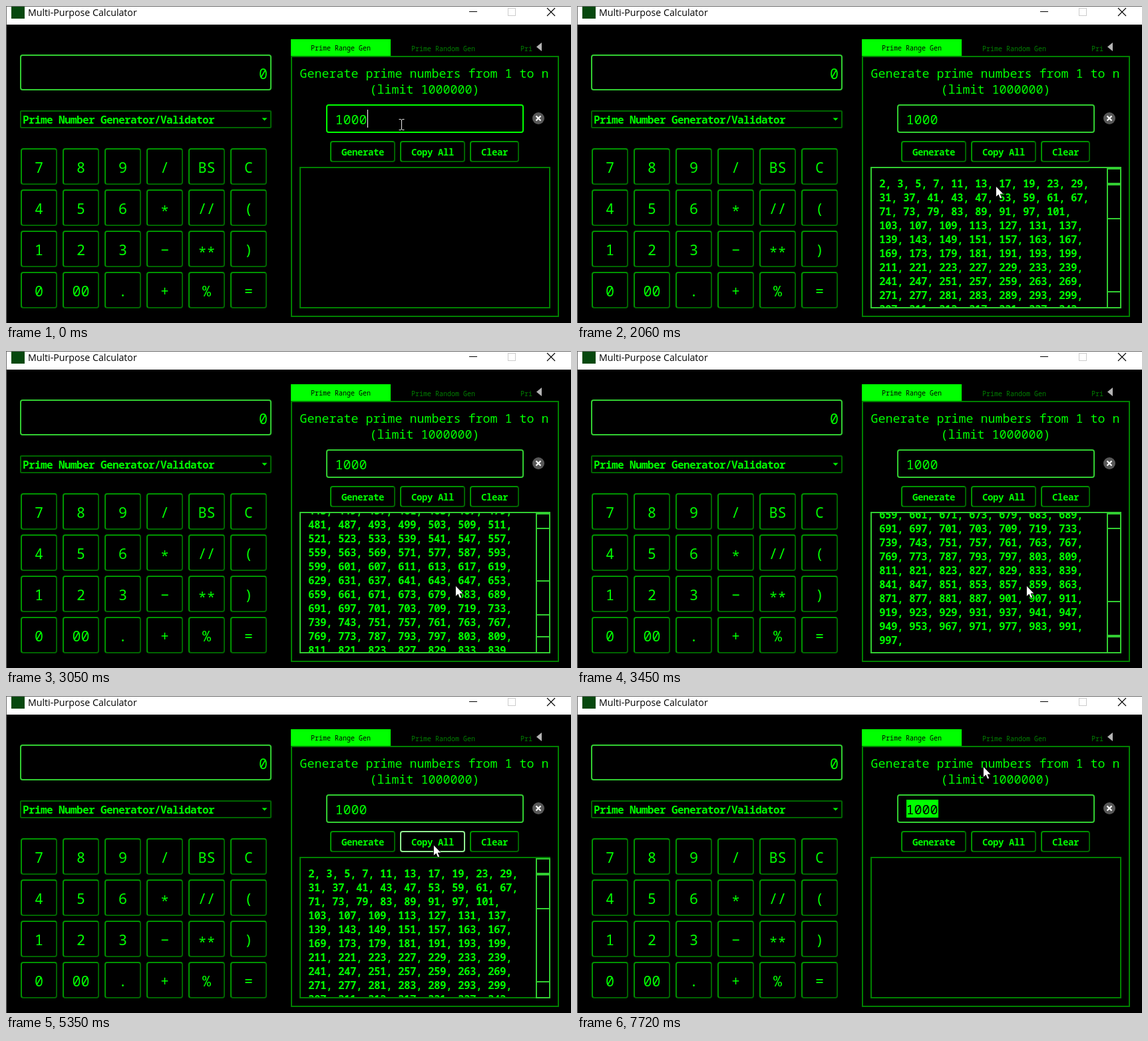
Recreate the animation shown at these times as an HTML page. Size 849 px wide and 477 px high, loop 8000 ms.

```html
<!DOCTYPE html>
<html lang="en">
<head>
<meta charset="utf-8">
<title>Multi-Purpose Calculator</title>
<style>
html, body { margin: 0; width: 100%; height: 100%; overflow: hidden; background: #000; }
svg { display: block; width: 849px; height: 477px; }
text { font-family: "Noto Sans Mono", "DejaVu Sans Mono", monospace; font-weight: 500; fill: #0f0; white-space: pre; }
text.title { font-family: "Open Sans", "Noto Sans", sans-serif; font-weight: 400; fill: #000; }
text.small { font-size: 16px; font-weight: 600; letter-spacing: -.6px; }
.box { fill: none; stroke-width: 2; }
</style>
</head>
<body>
<svg viewBox="0 0 849 477" xmlns="http://www.w3.org/2000/svg">
  <defs>
    <linearGradient id="bevel" x1="0" y1="0" x2="1" y2="1">
      <stop offset=".5" stop-color="#009400"/><stop offset=".5" stop-color="#006400"/>
    </linearGradient>
    <clipPath id="view"><rect x="443" y="244" width="353" height="209"/></clipPath>
    <clipPath id="tabClip"><rect x="760" y="50" width="31" height="25"/></clipPath>
  </defs>
  <rect width="849" height="477"/>
  <rect width="849" height="28" fill="#fff"/>
  <path d="M0 .5H849M.5 0V477" stroke="#6a6a6a"/>
  <rect x="8" y="1" width="20" height="18" fill="#06480e"/>
  <path d="M696 8.500h12" stroke="#000"/>
  <rect x="754.5" y="3.5" width="11" height="11" fill="none" stroke="#ccc"/>
  <path d="M813 3l12 12m0-12l-12 12" stroke="#000" stroke-width="1.1"/>
  <g id="ui"></g>
  <path d="M384.500 168.500h8l-4 4z" fill="#0f0"/>
  <path d="M805 55v13l-8-6.500z" fill="#b4b4b4"/>
  <circle cx="800" cy="169" r="9" fill="#585858"/>
  <path d="M796.500 165.500l7 7m0-7l-7 7" stroke="#fff" stroke-width="2.200"/>
  <g id="result">
    <g clip-path="url(#view)"><g id="lines"></g></g>
    <g class="box" stroke="#32cd32">
      <path d="M797 245h20v209h-20zM797 267h20M797 430h20"/>
      <rect id="thumb" x="797" y="269" width="20" height="51"/>
    </g>
  </g>
  <g id="arrow"><path d="M.5 0V16.500L4.300 13 6.800 19 9.600 17.800 7.100 12H12z" fill="#fff" stroke="#000" stroke-width=".8"/></g>
  <g id="beam"><path d="M-3.500-7.500H-1L.5-6.500 2-7.500H4.500M.5-6.500V7.500M-3.500 8.500H-1L.5 7.500 2 8.500H4.500" fill="none" stroke="#e8e8e8"/></g>
</svg>
<script>
const $ = id => document.getElementById(id);
const LIME = '#00ff00', SOFT = '#32cd32', DARK = '#008000', DIM = '#006400', PALE = '#90ee90';
const BEVEL = 'url(#bevel)';
const LOOP = 8000, FIRST = 440, STEP = 135;
const LISTED = 1790, CLEARED = 5975, PRESS = 6515, RELEASE = 6920;

function add(parent, tag, attrs, text) {
  const el = document.createElementNS('http://www.w3.org/2000/svg', tag);
  for (const k in attrs) el.setAttribute(k, attrs[k]);
  if (text) el.textContent = text;
  parent.appendChild(el);
  return el;
}
const ui = $('ui');
const label = (text, x, y, size, more) =>
  add(ui, 'text', { x, y, 'font-size': size, ...more }, text);
const mid = { 'text-anchor': 'middle' };

// A frame given by its outer edges, with a 2px line.
function box(x, y, w, h, stroke, rx = 0) {
  const el = add(ui, 'rect', { class: 'box', x: x + 1, y: y + 1, width: w - 2, height: h - 2, rx, stroke });
  const hit = p => p.x >= x && p.x <= x + w && p.y >= y && p.y <= y + h + 1;
  return { hit, paint: c => el.setAttribute('stroke', c) };
}

label('Multi-Purpose Calculator', 33, 15, 14.2, { class: 'title' });
box(21, 73, 378, 54, SOFT, 3);
label('0', 393, 110, 21.7, { 'text-anchor': 'end' });
const combo = box(21, 157, 378, 27, DIM, 1);
label('Prime Number Generator/Validator', 25, 177, 16, { class: 'small' });

['7 8 9 / BS C', '4 5 6 * // (', '1 2 3 − ** )', '0 00 . + % ='].forEach((row, r) =>
  row.split(' ').forEach((k, c) => {
    const x = 22 + 63 * c, y = 214 + 62 * r;
    box(x, y, 55, 55, BEVEL, 3);
    label(k, x + 27.5, y + 36.5 + (k[0] === '*' ? 4 : 0), 21.7, mid);
  }));

add(ui, 'rect', { x: 428, y: 50, width: 150, height: 25, fill: LIME });
const pane = box(428, 75, 403, 393, DARK);
label('Prime Range Gen', 458, 67, 10, { style: 'fill:#000' });
label('Prime Random Gen', 609, 68, 10, { style: 'fill:' + DARK });
label('Prime', 773, 68, 10, { style: 'fill:' + DARK, 'clip-path': 'url(#tabClip)' });
label('Generate prime numbers from 1 to n', 628.5, 108, 18.33, mid);
label('(limit 1000000)', 629, 132, 18.33, mid);

const input = box(481, 148, 297, 43, SOFT, 3);
const digits = [...'1000'].map((d, i) => {
  const x = 495 + 12 * i;
  return {
    x,
    back: add(ui, 'rect', { x, y: 156, width: 12, height: 27, fill: LIME }),
    glyph: label(d, x - 0.5, 178, 20)
  };
});
const caret = add(ui, 'rect', { x: 543, y: 156, width: 1, height: 27, fill: '#fff' });

let left = 487;
const buttons = ['Generate', 'Copy All', 'Clear'].map(name => {
  const w = 34 + 8 * name.length, b = box(left, 203, w, 32, BEVEL, 3);
  label(name, left + w / 2, 225, 14, { ...mid, 'font-weight': 600, style: 'font-weight:600;letter-spacing:-.4px' });
  left += w + 7;
  return b;
});
const area = box(441, 242, 377, 213, DARK);

// The calculator's flawed quadratic-form sieve, including its off-by-one strike.
function sieve(limit) {
  const on = new Set();
  const mark = (n, ...rest) => { if (n <= limit && rest.includes(n % 12)) on.add(n); };
  for (let x = 1; x < 32; x++) for (let y = 1; y < 32; y++) {
    mark(4 * x * x + y * y, 1, 5);
    mark(3 * x * x + y * y, 7);
    if (x > y) mark(3 * x * x - y * y, 11);
  }
  for (let r = 7; r * r < limit; r++)
    if (on.has(r)) for (let n = r * r; n < limit; n += r * r) on.delete(n + 1);
  return [2, 3, ...[...on].filter(n => n === 5 || n % 5).sort((a, b) => a - b)];
}
function wrap(words, width) {
  const out = [''];
  for (const w of words) {
    const last = out[out.length - 1], next = last ? last + ' ' + w : w;
    if (next.length <= width) out[out.length - 1] = next; else out.push(w);
  }
  return out;
}
wrap(sieve(1000).map(n => n + ','), 36).forEach((s, i) =>
  add($('lines'), 'text', { x: 454, y: 272.5 + 21 * i, class: 'small' }, s));

// Places the pointer visits: time, x, y.
const stops = [
  [305, 594, 178], [980, 582, 458], [LISTED, 544, 223], [2060, 629, 271], [2465, 675, 353],
  [4625, 675, 353], [5300, 642, 224], [5840, 728, 222], [6380, 626, 192],
  [6785, 397, 170], [RELEASE, 397, 170], [7325, 500, 56], [7595, 610, 106]
];
const ramp = (t, a, b) => Math.min(1, Math.max(0, (t - a) / (b - a)));
const ease = k => k * k * (3 - 2 * k);

function pointer(t) {
  const i = Math.max(1, stops.findIndex(s => s[0] >= t));
  const [a, x0, y0] = t > stops.at(-1)[0] ? stops.at(-1) : stops[i - 1];
  const [b, x1, y1] = t > stops.at(-1)[0] ? [t, x0, y0] : stops[i];
  const k = ease(ramp(t, a, b));
  return { x: Math.round(x0 + (x1 - x0) * k), y: Math.round(y0 + (y1 - y0) * k) };
}
const scrollAt = t => 300 * ramp(t, 2465, 3005) + 120 * ramp(t, 3140, 3410) - 420 * ramp(t, 3680, 4085);
const show = (el, on) => el.setAttribute('visibility', on ? 'visible' : 'hidden');

function draw(now) {
  // The screen refreshes in even steps.
  const t = now < FIRST ? 0 : FIRST + Math.floor((now - FIRST) / STEP) * STEP;
  const p = pointer(t);
  const dragging = t >= PRESS && t < RELEASE;
  const over = dragging || input.hit(p);

  input.paint(over ? LIME : SOFT);
  combo.paint(!dragging && combo.hit(p) ? LIME : DIM);
  area.paint(area.hit(p) ? SOFT : DARK);
  pane.paint(p.y < 75 ? SOFT : DARK);
  buttons.forEach(b => b.paint(b.hit(p) ? PALE : BEVEL));
  show(caret, t < LISTED);

  digits.forEach(d => {
    const on = t >= RELEASE || dragging && d.x + 6 >= p.x;
    show(d.back, on);
    d.glyph.style.fill = on ? '#000' : LIME;
  });

  const scroll = scrollAt(t);
  show($('result'), t >= LISTED && t < CLEARED);
  $('lines').setAttribute('transform', `translate(0 ${-scroll})`);
  $('thumb').setAttribute('y', 269 + Math.round(scroll * 0.258));

  show($('beam'), over);
  show($('arrow'), !over);
  for (const id of ['beam', 'arrow']) $(id).setAttribute('transform', `translate(${p.x} ${p.y})`);
}

const start = performance.now();
function tick() {
  draw((performance.now() - start) % LOOP);
  requestAnimationFrame(tick);
}
tick();
</script>
</body>
</html>
```
